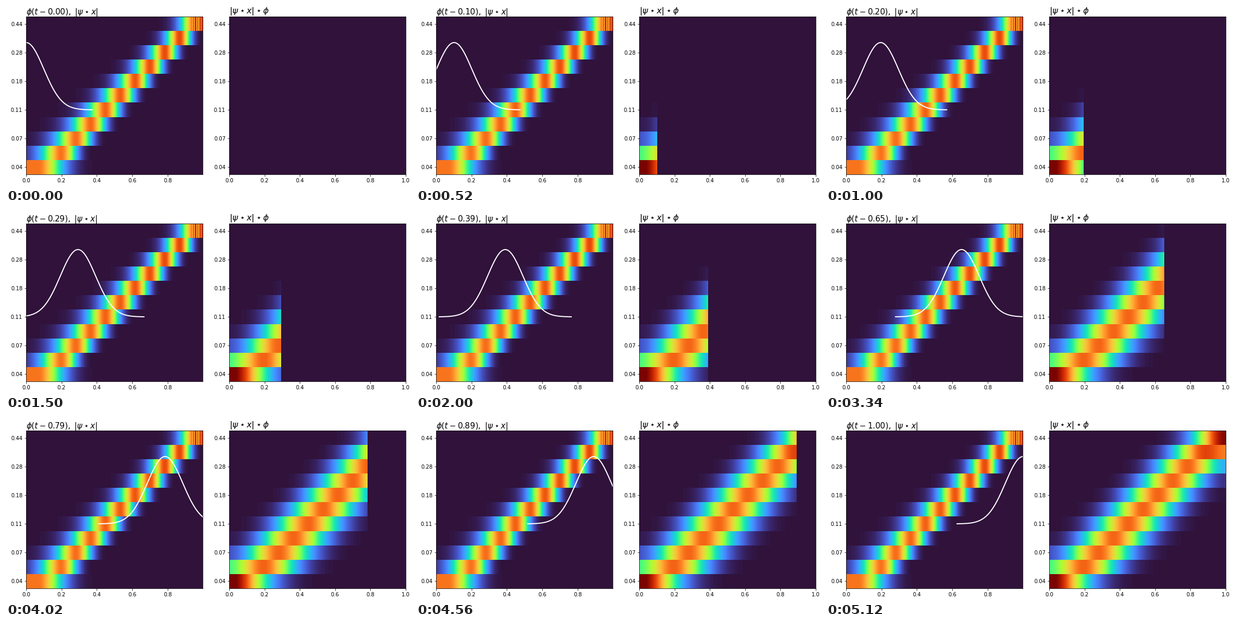
These frames come from a looping animation (762 by 338 pixels, 5140 ms). A matplotlib script:

```python
import numpy as np
import matplotlib.pyplot as plt
from matplotlib.animation import FuncAnimation
from matplotlib.patches import Rectangle

W, H, DPI = 762, 338, 72
STEPS = 256
ROWS = 11
LEFT, RIGHT, AX_W = 38, 421, 333    # panel positions and width in px
TOP, BOTTOM = 20, 318
SIGMA = 0.1         # width of the lowpass filter
SPAN = 0.373        # half of its support
RATE = 2.76         # exponential growth of the chirp's frequency

plt.rcParams["font.family"] = "DejaVu Sans"
plt.rcParams["mathtext.fontset"] = "dejavusans"

x = (np.arange(512) + 0.5) / 512


def bump(center, sigma):
    return np.exp(-0.5 * ((x - center) / sigma) ** 2)


def ridge(center, sigma):
    """Response of one band to the chirp: gaussian in frequency, not in time."""
    return np.exp(-0.5 * (np.expm1(RATE * (x - center)) / (RATE * sigma)) ** 2)


def row_center(r):
    return 0.197 + 0.0838 * (9 - r)


def row_sigma(r):
    return (15 + 0.88 * (r - 1)) / AX_W


def scalogram():
    img = np.zeros((ROWS, x.size))
    for r in range(1, ROWS - 1):
        img[r] = (0.83 - 0.008 * (r - 1)) * ridge(row_center(r), row_sigma(r))
    img[-1] = 0.765 * np.where(x < 0.068, 1, bump(0.068, 0.093))
    # top band: rises, then beats against the sampling rate
    rise = np.where(x < 0.95, ridge(0.95, 0.047), 1)
    beat = np.clip((x - 0.925) / 0.04, 0, 1)
    wave = np.cos(2 * np.pi * (x - 0.958) / 0.0125)
    slow = np.cos(2 * np.pi * (x - 0.958) / 0.031)
    img[0] = 0.78 * rise + beat * (0.12 * wave + 0.07 * slow)
    return img


def scattering():
    img = np.zeros((ROWS, x.size))
    for r in range(1, ROWS - 1):
        c, s = row_center(r), np.hypot(row_sigma(r), SIGMA)
        # mirrored copies come from the reflected boundaries
        img[r] = 0.785 * (bump(c, s) + bump(-c, s) + bump(2 - c, s))
    img[0] = 0.99 * bump(1, 39 / AX_W)
    img[-1] = 1.04 * bump(0, 47 / AX_W)
    return img


fig = plt.figure(figsize=(W / DPI, H / DPI), dpi=DPI, facecolor="white")


def panel(left, img, xmax, ticks):
    ax = fig.add_axes([left / W, 1 - BOTTOM / H, AX_W / W, (BOTTOM - TOP) / H])
    ax.imshow(img, cmap="turbo", vmin=0, vmax=1, aspect="auto",
              interpolation="nearest", extent=(0, 1, ROWS - 0.5, -0.5))
    ax.set_xlim(0, xmax)
    ax.set_ylim(ROWS - 0.5, -0.5)
    ax.set_xticks(ticks, [f"{v:.1f}" for v in ticks])
    ax.set_yticks(range(0, ROWS, 2), ["0.44", "0.28", "0.18", "0.11", "0.07", "0.04"])
    ax.tick_params(labelsize=10)
    return ax


def heading(left, baseline, text, size):
    return fig.text(left / W, 1 - baseline / H, text, fontsize=size,
                    ha="left", va="baseline")


ax_in = panel(LEFT, scalogram(), 0.998, np.arange(5) * 0.2)
ax_out = panel(RIGHT, scattering(), 1, np.arange(6) * 0.2)

title = heading(LEFT, 16, "", 15)
heading(RIGHT, 14, r"$|\psi \star x| \star \phi$", 16)

u = np.linspace(-SPAN, SPAN, 241)
phi = 6 - 4.69 * np.exp(-0.5 * (u / SIGMA) ** 2)
curve, = ax_in.plot([], [], color="white", lw=2)

cover = Rectangle((0, -0.5), 1, ROWS, fc=plt.get_cmap("turbo")(0), ec="none", lw=0)
ax_out.add_patch(cover)


def update(i):
    t = i / STEPS
    title.set_text(rf"$\phi(t - {t:.2f}),\ |\psi \star x|$")
    curve.set_data(u + t, phi)
    cover.set_x(t)
    cover.set_width(1 - t)
    return title, curve, cover


anim = FuncAnimation(fig, update, frames=STEPS + 1, interval=20,
                     repeat=True, repeat_delay=0, blit=False)
plt.show()
```
